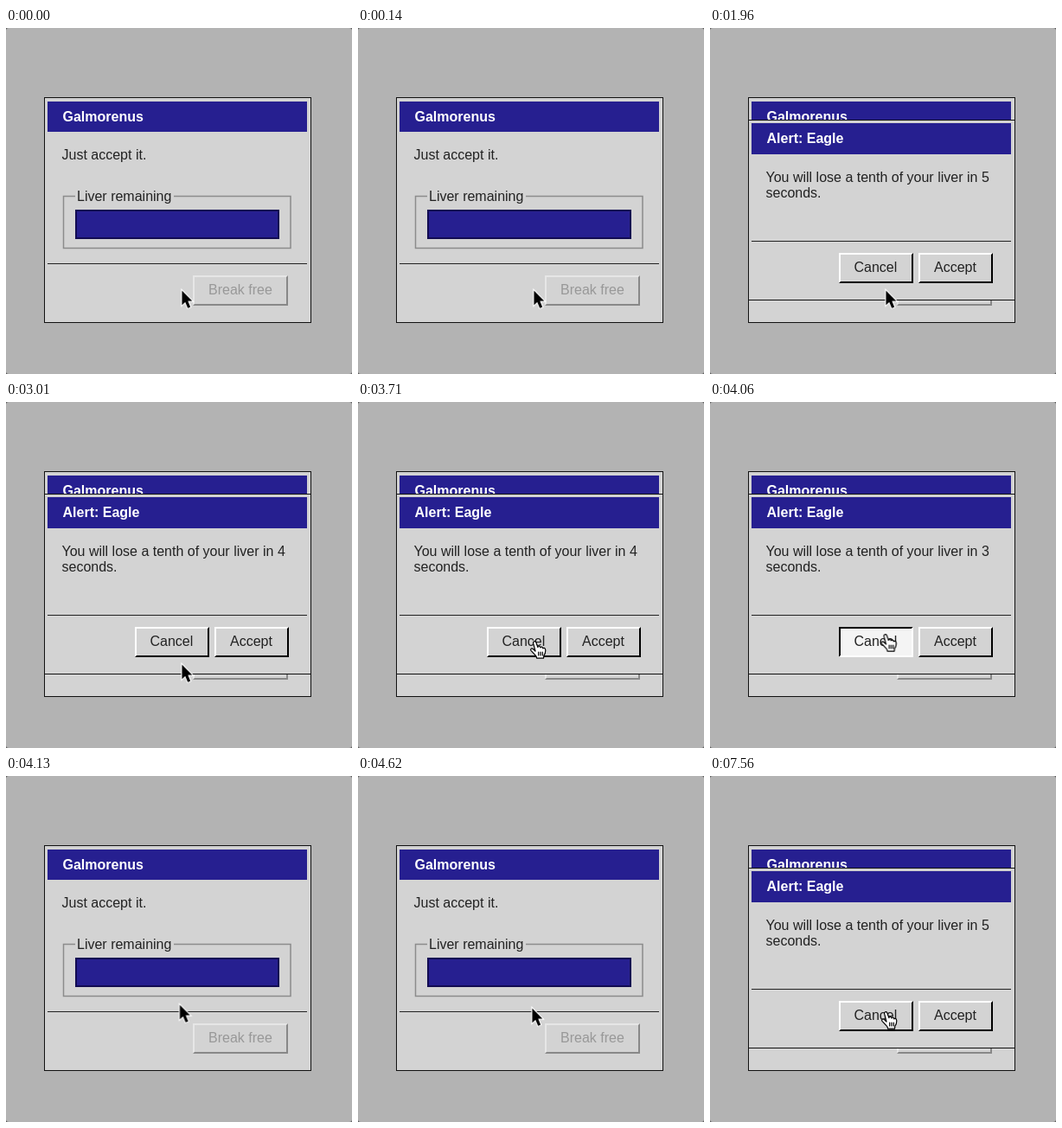
These frames come from a looping animation (400 px wide and 400 px high, 8000 ms). An HTML page:

```html
<!DOCTYPE html>
<html lang="en">
<head>
<meta charset="utf-8">
<title>Liver dialog</title>
<style>
  html, body { margin: 0; width: 100%; height: 100%; overflow: hidden; background: #555; }
  svg { display: block; width: 100vw; height: 100vh; }
  text { font: 16px "Liberation Sans", Arial, Helvetica, sans-serif; fill: #222; white-space: pre; }

  .window { fill: #d3d3d3; stroke: #111; }
  .bar { fill: #261f90; }
  .title { font-weight: bold; fill: #fff; }
  .rule { fill: #222; }
  .groove { fill: none; stroke: #8c8c8c; stroke-width: 1.5; }
  .meter { fill: #261f90; stroke: #120b52; stroke-width: 2; }

  .face { fill: #d3d3d3; }
  .lit { fill: #fff; }
  .dark { fill: #000; }
  .off .lit { fill: #e6e6e6; }
  .off .dark { fill: #888; }
  .off text { fill: #989898; }
  .pressed .face { fill: #f4f4f4; }
  .pressed .lit { fill: #000; }
  .pressed .dark { fill: #fff; }

  .arrow { fill: #000; stroke: #fff; stroke-width: 2.4; paint-order: stroke; }
  .hand { fill: #fff; stroke: #000; stroke-width: 1.2; stroke-linejoin: round; stroke-linecap: round; }

  .alert, .count, .pressed, .cursor, .arrow, .hand { animation: 8s step-end infinite; }
  .alert { animation-name: alert; }
  .five { animation-name: five; }
  .four { animation-name: four; }
  .three { animation-name: three; }
  .pressed { animation-name: press; }
  .cursor { animation-name: move; }
  .arrow { animation-name: arrow; }
  .hand { animation-name: hand; }

  @keyframes alert {
    0%, 51.625% { opacity: 0; }
    24.5%, 94.5%, 100% { opacity: 1; }
  }
  @keyframes five {
    0%, 51.625%, 100% { opacity: 1; }
    37.625% { opacity: 0; }
  }
  @keyframes four {
    0%, 49.875%, 100% { opacity: 0; }
    37.625% { opacity: 1; }
  }
  @keyframes three {
    0%, 51.625%, 100% { opacity: 0; }
    49.875% { opacity: 1; }
  }
  @keyframes press {
    0%, 51.625%, 100% { opacity: 0; }
    50.75% { opacity: 1; }
  }
  @keyframes arrow {
    0%, 51.625% { opacity: 1; }
    45.5%, 94.5%, 100% { opacity: 0; }
  }
  @keyframes hand {
    0%, 51.625% { opacity: 0; }
    45.5%, 94.5%, 100% { opacity: 1; }
  }
  @keyframes move {
    0% { transform: translate(203px, 303px); }
    44.625% { transform: translate(203px, 297px); }
    45.5% { transform: translate(202px, 284px); }
    46.375% { transform: translate(202px, 272px); }
    47.25% { transform: translate(201px, 268px); }
    48.125% { transform: translate(201px, 265px); }
    49% { transform: translate(200.5px, 264px); }
    56% { transform: translate(201px, 265px); }
    56.875% { transform: translate(201px, 267px); }
    57.75%, 100% { transform: translate(201px, 268px); }
  }
</style>
</head>
<body>
<svg viewBox="0 0 400 400">
  <defs>
    <g id="button">
      <path class="face" d="M0 0h86v35h-86z"/>
      <path class="lit" d="M0 35V0H86L84 2H2V33Z"/>
      <path class="dark" d="M86 0V35H0L2 33H84V2Z"/>
    </g>
  </defs>

  <rect width="400" height="400" rx="3" fill="#b3b3b3"/>

  <g>
    <rect class="window" x="44.5" y="80.5" width="308" height="260"/>
    <rect class="bar" x="48" y="85" width="300" height="35"/>
    <text class="title" x="65.5" y="108">Galmorenus</text>
    <text x="64.5" y="152">Just accept it.</text>
    <path class="groove" d="M80 194.5H66.5V254.5H329V194.5H194"/>
    <text x="82" y="200">Liver remaining</text>
    <rect class="meter" x="81" y="211" width="234" height="32"/>
    <rect class="rule" x="48" y="272" width="300" height="1"/>
    <g class="off">
      <path class="lit" d="M216 321V286H326L324 288H218V319Z"/>
      <path class="dark" d="M326 286V321H216L218 319H324V288Z"/>
      <text x="234" y="308">Break free</text>
    </g>
  </g>

  <g class="alert">
    <rect class="window" x="44.5" y="106.5" width="308" height="208"/>
    <rect class="bar" x="48" y="110" width="300" height="36"/>
    <text class="title" x="65.5" y="133">Alert: Eagle</text>
    <text x="64.5" y="178">You will lose a tenth of your liver in</text>
    <text class="count five" x="314" y="178">5</text>
    <text class="count four" x="314" y="178">4</text>
    <text class="count three" x="314" y="178">3</text>
    <text x="64.5" y="196">seconds.</text>
    <rect class="rule" x="48" y="246" width="300" height="1"/>
    <use href="#button" x="149" y="260"/>
    <use href="#button" x="241" y="260"/>
    <g class="pressed">
      <g transform="translate(149 260)">
        <path class="face" d="M0 0h86v35h-86z"/>
        <path class="lit" d="M0 35V0H86L84 2H2V33Z"/>
        <path class="dark" d="M86 0V35H0L2 33H84V2Z"/>
      </g>
    </g>
    <text x="166.5" y="282">Cancel</text>
    <text x="259" y="282">Accept</text>
  </g>

  <g class="cursor">
    <g class="arrow">
      <path transform="translate(.4 .6) scale(.9)" d="M0 0V18.5L4.2 14.6L7.5 22.4L10.8 21L7.6 13.4H13.2Z"/>
    </g>
    <g class="hand">
      <g transform="translate(-4 3)">
        <path d="M7 13L4.7 4.2C4.1 1.6 7 .6 7.9 3L9.9 8.6C10.3 7.1 12.6 7.1 12.9 9C13.4 7.7 15.5 7.9 15.8 9.8C16.5 8.8 18.4 9.3 18.7 11.3C19 14 18.4 16 16.9 18.2L16.5 21.2H8.6L8 18.8C6 16.8 4.5 14.8 2.2 12.6C.8 10.8 2.6 9.2 4.4 10.5Z"/>
        <path d="M10.7 14v4M13 14v4M15.3 14v4"/>
      </g>
    </g>
  </g>
</svg>
</body>
</html>
```
